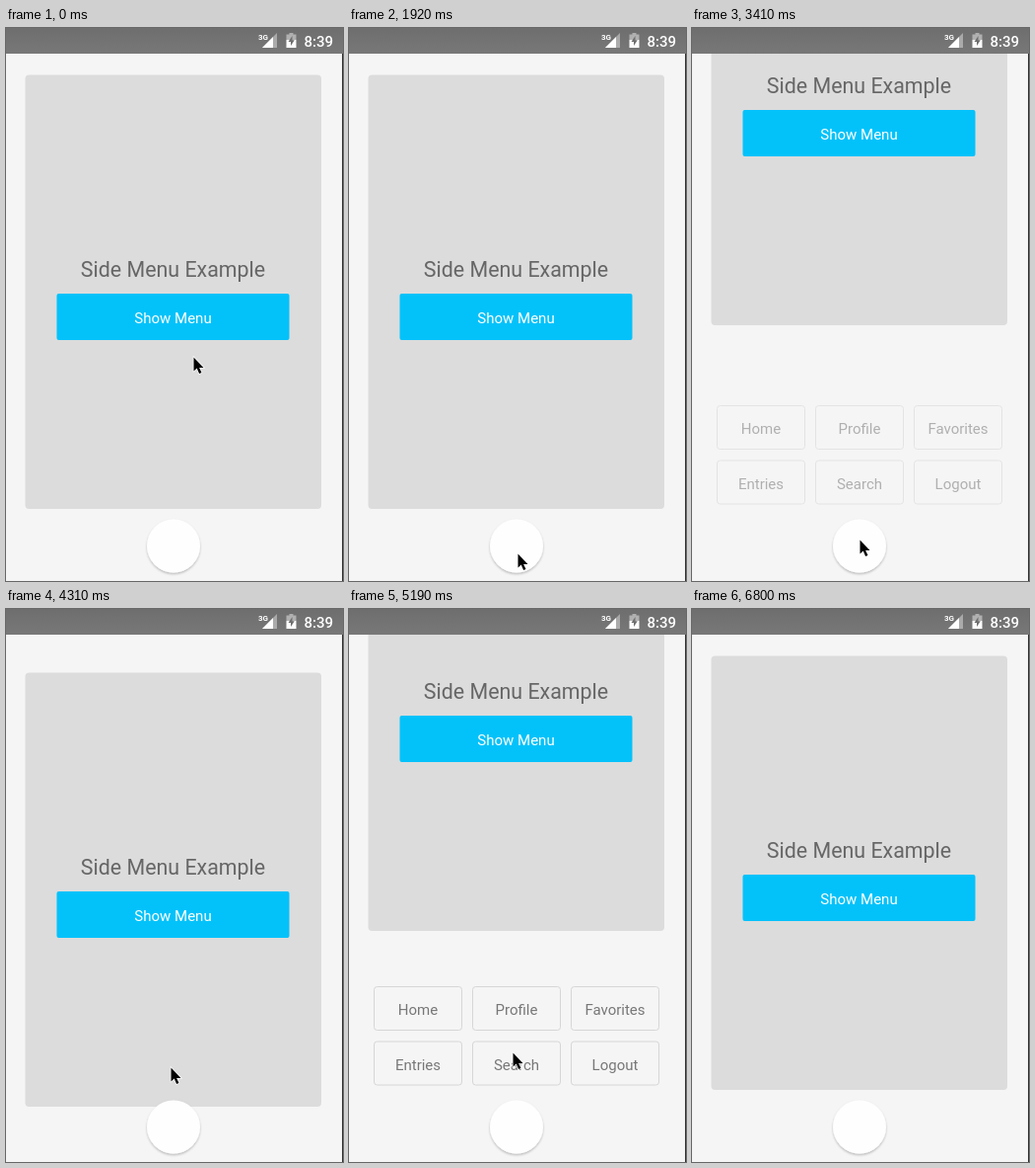
Write an HTML page that moves like this. It is 342 px wide and 560 px high and loops after 6950 ms.

```html
<!DOCTYPE html>
<html lang="en">
<head>
<meta charset="utf-8">
<title>Side Menu Example</title>
<style>
  html, body { margin: 0; width: 100%; height: 100%; overflow: hidden; background: #f5f5f5; }
  svg { display: block; font: 15px Roboto, sans-serif; }
  #menu rect { fill: none; stroke: #d6d6d6; }
  #menu text { fill: #777; }
  #card text, #menu text { text-anchor: middle; }
</style>
</head>
<body>
<svg width="342" height="560" viewBox="0 0 342 560">
  <defs>
    <linearGradient id="bar" x2="0" y2="1">
      <stop stop-color="#6e6e6e"/>
      <stop offset="1" stop-color="#787878"/>
    </linearGradient>
    <filter id="shadow" x="-30%" y="-30%" width="160%" height="160%">
      <feDropShadow dx="0" dy="1.5" stdDeviation="1.3" flood-opacity=".25"/>
    </filter>
  </defs>
  <rect width="342" height="560" fill="#f5f5f5"/>
  <g id="menu"></g>
  <g id="card">
    <rect x="19.5" y="47.5" width="300.5" height="439.5" rx="4" fill="#dcdcdc"/>
    <text x="169.5" y="252" font-size="21.4" fill="#666">Side Menu Example</text>
    <rect x="51.5" y="269" width="236" height="47" rx="2" fill="#03c2fa"/>
    <text x="169.5" y="299" fill="#fff">Show Menu</text>
  </g>
  <circle cx="170" cy="524.5" r="27" fill="#fefefe" filter="url(#shadow)"/>
  <rect x="341" y="26" width="1" height="534" fill="#333"/>

  <!-- status bar -->
  <rect width="342" height="26" fill="url(#bar)"/>
  <g fill="#fff">
    <text x="256" y="12" font-size="8" font-weight="700">3G</text>
    <path d="M260 20L275 5V20Z" opacity=".4"/>
    <path d="M260 20L271 9V20Z"/>
    <path d="M284.5 6.5H287.5V5H291.5V6.5H294.5V12H284.5Z" opacity=".45"/>
    <path d="M284.5 12H294.5V20H284.5Z"/>
    <path d="M290.5 8L286.5 14H289V18L292.8 12.2H290.5Z" fill="#6e6e6e"/>
    <text x="302.5" y="18.5" font-weight="500">8:39</text>
  </g>

  <path id="cursor" d="M0 0V14L3.2 11 5.6 16.5 8 15.4 5.6 10.4H10Z" stroke="#fff" stroke-width="1.4" paint-order="stroke"/>
</svg>
<script>
const LOOP = 6950, STEP = 148, LAST = 46, RISE = -161;
const $ = id => document.getElementById(id);

// Step at which the menu opens (1) or closes (0)
const toggles = [[4.2, 1], [10.52, 0], [21.7, 1], [27.38, 0], [31.3, 1], [38.4, 0]];

// Pointer waypoints: step, x, y
const path = [
  [0, 190, 333], [1, 197, 400], [2, 186, 480], [3, 171, 532], [16, 171, 532],
  [18, 195, 377], [20, 170, 518], [26, 170, 518], [27, 170, 515], [28, 169, 500],
  [29, 167, 464], [31, 166, 298], [33, 166, 300], [35, 166, 449], [37, 170, 518],
  [40, 172, 516], [42, 182, 415], [45, 284, 548], [46, 320, 600]
];

[["Home", "Profile", "Favorites"], ["Entries", "Search", "Logout"]].forEach((row, r) =>
  row.forEach((label, c) => {
    const x = 25.5 + 100 * c, y = 382.5 + 55.5 * r;
    $("menu").innerHTML += `<rect x="${x}" y="${y}" width="89" height="44" rx="3"/>
      <text x="${x + 44.5}" y="${y + 28.5}">${label}</text>`;
  }));

// Underdamped spring from 0 to 1, peaking after 190 ms
function spring(ms) {
  if (ms > 350) return 1;
  const a = Math.PI * ms / 190;
  return 1 - Math.exp(-0.593 * a) * (Math.cos(a) + 0.593 * Math.sin(a));
}

function menuState(n) {
  const toggle = toggles.filter(([start]) => start <= n).pop();
  if (!toggle) return [0, 0];
  const [start, open] = toggle, ms = (n - start) * STEP;
  const mix = v => open ? v : 1 - v;
  return [mix(spring(ms)), mix(Math.min(1, ms / 350))];
}

function pointer(n) {
  const i = Math.max(1, path.findIndex(p => p[0] >= n));
  const [n0, x0, y0] = path[i - 1], [n1, x1, y1] = path[i];
  const k = (n - n0) / (n1 - n0);
  return [x0 + (x1 - x0) * k, y0 + (y1 - y0) * k];
}

const move = (id, x, y) => $(id).setAttribute("transform", `translate(${x} ${y})`);

function draw(now) {
  // The motion is held in equal steps
  const n = Math.min(LAST, Math.floor((now % LOOP + 8) / STEP));
  const [rise, fade] = menuState(n);
  move("card", 0, Math.round(RISE * rise));
  $("menu").setAttribute("opacity", fade);
  move("cursor", ...pointer(n).map(v => Math.round(v) + 0.5));
}

const begin = performance.now();
function tick() {
  draw(performance.now() - begin);
  requestAnimationFrame(tick);
}
tick();
</script>
</body>
</html>
```
